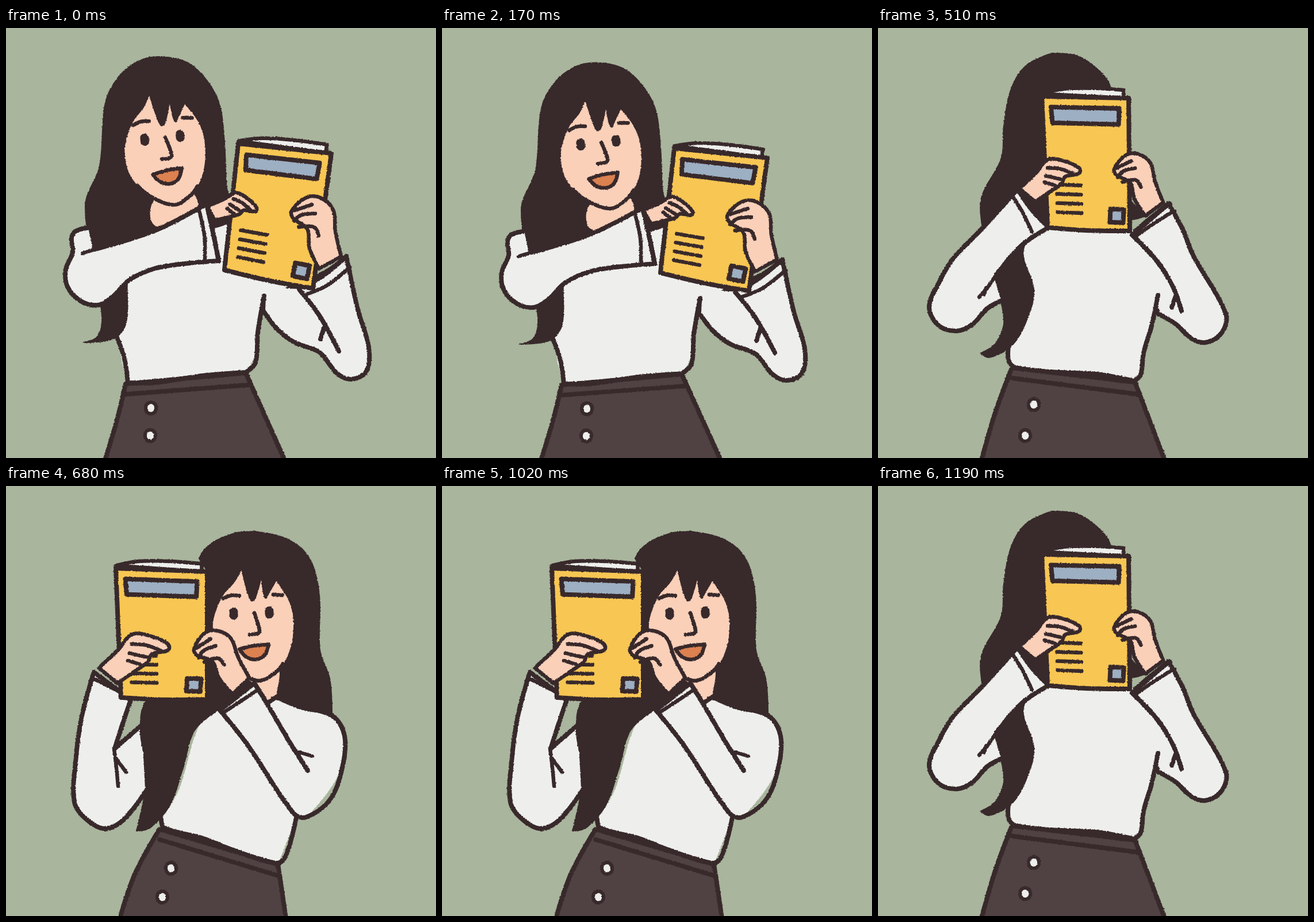
These frames come from a looping animation (748 by 748 pixels, 1360 ms). An HTML page:

```html
<!DOCTYPE html>
<html lang="en">
<head>
<meta charset="utf-8">
<title>Reader swaying with a yellow book</title>
<style>
  html, body { margin: 0; height: 100%; overflow: hidden; background: #a9b59d; }
  svg { display: block; width: 100vw; height: 100vh; }
  path { fill: none; stroke: #38292b; stroke-width: 6.5; stroke-linecap: round; stroke-linejoin: round; }
  .hair { fill: #38292b; stroke-width: 2; }
  .skin { fill: #fad0b9; stroke: none; }
  .hand { fill: #fad0b9; }
  .top { fill: #eeefec; stroke: none; }
  .sleeve { fill: #eeefec; }
  .sleeve, .edge, .skirt, .book, .plate { stroke-width: 8; }
  .skirt { fill: #504143; }
  .page { fill: #eeefec; }
  .book { fill: #f8c653; }
  .plate { fill: #9dafc2; }
  .mouth { fill: #dc8150; }
  .eye { stroke-width: 15; }
  .ring { stroke-width: 24; }
  .pip { stroke: #eeefec; stroke-width: 12; }
</style>
</head>
<body>
<svg viewBox="0 0 748 748">
  <filter id="crayon" filterUnits="userSpaceOnUse" x="-10" y="-10" width="768" height="780" color-interpolation-filters="sRGB">
    <feTurbulence type="fractalNoise" baseFrequency=".35" numOctaves="2"/>
    <feDisplacementMap in="SourceGraphic" scale="3" xChannelSelector="R" yChannelSelector="G"/>
  </filter>
  <g id="stage" filter="url(#crayon)"></g>
</svg>
<script>
const openStyles = ["line", "edge", "eye", "ring", "pip"];
const mix = (a, b, t) => a.map((n, k) => n + (b[k] - n) * t);

// Smooth curve through "x,y" points; "!" marks a corner.
function curve(text, closed, map) {
  const pts = text.split(" ").map(s => ({ xy: map(s.split(",").map(parseFloat)), corner: s.endsWith("!") }));
  const count = pts.length, at = i => pts[(i + count) % count];
  const tangent = i => {
    if (at(i).corner || (!closed && (i === 0 || i === count - 1))) return [0, 0];
    const [a, b] = [at(i - 1).xy, at(i + 1).xy];
    const length = Math.hypot(b[0] - a[0], b[1] - a[1]) || 1;
    return [(b[0] - a[0]) / length, (b[1] - a[1]) / length];
  };
  let d = "M" + pts[0].xy;
  for (let i = 0; i < (closed ? count : count - 1); i++) {
    const p = at(i).xy, q = at(i + 1).xy, reach = Math.hypot(q[0] - p[0], q[1] - p[1]) / 3;
    const u = tangent(i), v = tangent((i + 1) % count);
    d += `C${p.map((n, k) => n + u[k] * reach)} ${q.map((n, k) => n - v[k] * reach)} ${q}`;
  }
  return closed ? d + "Z" : d;
}

// ";" separates curves that share a style.
function shape(style, text, map = p => p) {
  const closed = !openStyles.includes(style);
  return `<path class="${style}" d="${text.split(";").map(part => curve(part, closed, map)).join("")}"/>`;
}

function face(x, y, tilt) {
  const c = Math.cos(tilt * Math.PI / 180), s = Math.sin(tilt * Math.PI / 180);
  const map = ([a, b]) => [x + a * c - b * s, y + a * s + b * c];
  return shape("skin", "-15,-75! -4,-27 2,-20 9,-27 19,-57! 22,-30 26,-24 31,-31 45,-54! 63,-25 72,8 68,55 50,92 8,118 -33,98 -62,60 -68,22 -62,-5 -47,-34 -27,-55", map)
    + shape("line", "-52,78 -33,98 8,118 38,105 52,90;-48,-27 -34,-32 -20,-31;39,-31 55,-29;5,0 13,31 9,36 -5,37", map)
    + shape("eye", "-31,-3 -31,3;31,-3 31,3", map)
    + shape("mouth", "-23,62! 2,57 28,56! 20,74 4,81 -13,75", map);
}

// Grips run along the axis from the wrist (0) to the fingertip (100).
const leftGrip = {
  side: 1,
  outline: "-8,-16! 30,-28 58,-40 80,-28 101,-4 98,5 73,0 62,8 39,12 7,17!",
  fingers: "52,-27 71,-16 88,2;43,-16 67,3;36,-7 50,6"
};
const rightGrip = {
  side: -1,
  outline: "-3,-20! 34,-36 63,-53 90,-48 103,-31 100,0 89,5 63,-3 37,12 2,19!",
  fingers: "98,-4 89,-31;85,6 86,-8 75,-27;73,6 59,-13 44,-11"
};
function hand({ side, outline, fingers }, [x, y], [tipX, tipY]) {
  const ux = (tipX - x) / 100, uy = (tipY - y) / 100;
  const map = ([a, b]) => [x + ux * a - uy * b * side, y + uy * a + ux * b * side];
  return shape("hand", outline, map) + shape("line", fingers, map);
}

// The cover spans 0..100 both ways between its four corners.
function book(topLeft, topRight, bottomRight, bottomLeft) {
  const map = ([u, v]) => mix(mix(topLeft, topRight, u / 100), mix(bottomLeft, bottomRight, u / 100), v / 100);
  const rows = [67, 74, 81, 88].map(v => `13,${v} 42,${v}`).join(";");
  return shape("page", "0,-2! 25,-6 60,-7 94,-6! 94,0!", map)
    + shape("book", "0,0! 100,0! 100,100! 50,101 0,100!", map)
    + shape("plate", "10,8! 89,8! 88,20! 11,20!;77,84! 93,84! 92,94! 76,94!", map)
    + shape("line", rows, map);
}

function skirt(left, right, [hemLeft, hemRight], buttons) {
  const bulge = (right[1] - left[1]) / 8;
  const seam = [(left[0] + hemLeft) / 2 - bulge, (left[1] + 750) / 2];
  const dots = buttons.map(([x, y]) => `${x},${y - 1} ${x},${y + 1}`).join(";");
  return shape("skirt", `${left}! ${seam} ${hemLeft},752! ${hemLeft},790! ${hemRight},790! ${hemRight},752! ${right}!`)
    + shape("edge", `${left[0]},${left[1] + 18} ${right[0] + 4},${right[1] + 21}`)
    + shape("ring", dots) + shape("pip", dots);
}

const low = [
  shape("sleeve", "449,440! 447,491! 471,523 502,547 545,564 575,600 600,611 627,597 631,555 612,490 592,397! 520,448"),
  shape("top", "200,430 193,538! 210,617! 417,600! 437,560 449,464! 500,440 500,360 360,341"),
  skirt([208, 619], [417, 600], [172, 485], [[252, 661], [251, 709]]),
  shape("edge", "193,538 206,575 212,617! 260,617 340,605 417,599! 434,582 438,530 449,466"),
  shape("line", "520,464 558,448 598,416;362,341 392,337"),
  shape("edge", "510,455 545,500 579,562;555,516 547,541"),
  shape("hair", "268,50 315,60 350,92 372,135 380,200 384,278 394,335 250,365 214,425 209,512 188,540 135,547! 158,538 167,512 163,470 138,310 163,240 173,130 196,85 230,58"),
  shape("skin", "258,300 262,345 330,322 321,285"),
  face(272, 191, -6),
  shape("sleeve", "147,347! 122,353 114,365 116,390 104,420 107,450 130,475 160,482 185,468 215,438 260,418 320,409 370,405! 360,355 349,306! 260,352 155,385!"),
  shape("line", "133,392 155,385;336,318 345,360 346,403"),
  book([404, 201], [566, 218], [534, 453], [380, 421]),
  hand(leftGrip, [357, 322], [435, 315]),
  hand(rightGrip, [563, 408], [497, 318]),
  shape("edge", "349,306 360,355 370,405;592,398 565,419 543,431")
].join("");

const rising = [
  shape("sleeve", "490,385! 476,472! 500,497 545,520 577,547 602,555 628,542 633,512 578,390 549,322!"),
  shape("top", "215,420 195,562! 209,610! 436,604! 452,550 476,450! 495,400 480,375 340,337"),
  skirt([213, 610], [436, 603], [181, 490], [[256, 661], [251, 709]]),
  shape("edge", "195,562 204,600 215,609 330,603 380,600 436,602! 452,550 463,500 476,452"),
  shape("edge", "549,322 483,383! 495,398 525,438 562,487"),
  shape("line", "495,396 525,370 557,345;330,338 350,338"),
  shape("hair", "278,24! 345,36 380,65 404,120 380,270 322,350 213,425 225,475 218,520 195,565 173,576! 181,530 178,460 148,310 180,225 186,165 208,78 243,40"),
  shape("skin", "322,295 345,280 352,335 330,338"),
  face(294, 165, -1),
  shape("sleeve", "150,333! 133,350 123,385 103,415 97,450 112,478 140,487 165,475 200,430 245,395 330,367! 315,315 296,275! 200,345 155,370!"),
  shape("line", "124,387 158,370;290,282 303,325 308,370"),
  book([345, 126], [506, 138], [494, 368], [347, 356]),
  hand(leftGrip, [313, 290], [417, 262]),
  hand(rightGrip, [525, 337], [465, 265]),
  shape("edge", "296,275 315,315 330,367;549,322 510,354")
].join("");

const middle = [
  shape("sleeve", "470,440 487,497! 518,515 545,540 570,547 598,530 605,497 548,395 530,350 505,305! 445,355!"),
  shape("top", "253,380 300,350 440,350 490,410 487,465! 472,530 452,615! 235,592! 227,565 232,520 265,480"),
  skirt([233, 591], [447, 616], [180, 499], [[271, 655], [256, 709]]),
  shape("edge", "228,545 227,578 238,590 300,598 380,602 446,614! 457,603 462,565 476,518 487,465"),
  shape("edge", "442,360 485,405 513,450 528,492;518,466 511,486"),
  shape("line", "450,361 480,340 515,318"),
  shape("hair", "302,44! 345,48 380,70 404,102 440,300 463,328 290,350 253,385 271,455 260,505 235,550 195,573 178,566! 205,548 219,505 178,310 215,225 219,170 232,105 258,65"),
  shape("sleeve", "243,280! 180,350 130,402 105,445 89,485 105,517 137,527 165,515 190,488 218,473! 205,430! 250,378 297,347! 265,313"),
  shape("line", "232,290 250,318 268,355;205,430 190,452 176,468;188,452 184,464"),
  book([285, 119], [436, 122], [438, 353], [295, 347]),
  hand(leftGrip, [260, 290], [350, 247]),
  hand(rightGrip, [480, 315], [411, 245]),
  shape("edge", "243,280 265,313 297,347;507,305 475,332 442,360")
].join("");

const turning = [
  shape("hair", "402,81! 440,80 495,95 530,130 545,190 546,285 563,335 567,396! 470,380 350,370 350,150 337,125 360,98"),
  shape("sleeve", "153,324! 132,400 121,480 119,550 140,580 172,596 205,580 246,527! 240,412! 189,457! 204,410 217,372!"),
  shape("line", "188,457 192,490 195,522;190,472 209,498;152,335 198,358"),
  shape("top", "345,400 300,530 270,580! 270,600! 472,662! 505,577! 568,400! 510,384 467,367! 400,375"),
  skirt([267, 597], [473, 658], [198, 487], [[287, 665], [272, 715]]),
  shape("edge", "270,580 275,595 340,612 400,635 470,656 486,645 505,577"),
  shape("hair", "355,280 245,372 234,430 246,500 227,600! 250,595 285,555 308,490 328,425 370,388 420,345"),
  shape("skin", "415,325 432,345 457,376 470,366 467,305"),
  face(427, 221, -2),
  book([191, 143], [350, 149], [350, 371], [200, 368]),
  hand(leftGrip, [178, 329], [282, 279]),
  hand(rightGrip, [408, 348], [327, 284]),
  shape("top", "432,343! 460,380 510,384 568,400 589,435 585,490 522,576 500,570 372,390!"),
  shape("edge", "457,376 470,367! 510,384 568,400 589,435 585,490 564,545 522,576 500,569 420,450 372,390! 432,343! 455,380 490,440 525,495"),
  shape("line", "380,393 436,356;510,463 533,470")
].join("");

const leaning = [
  shape("hair", "455,90! 510,95 550,115 575,160 580,220 578,310 592,370 596,436! 530,420 400,410 360,300 363,220 372,160 400,115"),
  shape("sleeve", "150,402! 155,500 168,570 180,620 210,642 250,637 292,603! 262,580 268,463! 225,515! 220,472! 185,427"),
  shape("edge", "221,472 219,520 232,558 237,592;240,564 253,570"),
  shape("line", "153,421 185,450 218,478"),
  shape("top", "355,460 325,530 290,606! 495,690! 516,610 600,550 615,438! 575,432 528,407! 440,390"),
  skirt([293, 605], [489, 684], [187, 492], [[283, 660], [255, 717]]),
  shape("edge", "293,605 350,625 430,665 487,683 498,672 516,612"),
  shape("hair", "264,450! 262,530 265,575 254,606! 285,598 310,565 335,510 362,450"),
  shape("skin", "443,330 440,375 420,390 465,417 528,406 515,375 512,320"),
  face(467, 229, 0),
  book([188, 236], [351, 222], [374, 455], [227, 464]),
  hand(leftGrip, [173, 412], [261, 355]),
  hand(rightGrip, [394, 407], [312, 349]),
  shape("top", "415,395! 465,419 500,419 528,407! 575,432 615,438! 624,460 605,550 540,614 510,605 355,460!"),
  shape("edge", "528,407 575,432 615,438! 624,460 605,550 570,597 540,614 510,604 440,530 355,460! 415,393! 450,435 490,477 530,500"),
  shape("line", "150,402 185,427 220,472;366,458 420,405;515,491 545,494;422,400 465,417 500,418 528,407")
].join("");

const dip = `<g transform="translate(0 748) scale(1 .985) translate(0 -748)">${low}</g>`;
const stage = document.getElementById("stage");
stage.innerHTML = [low, dip, rising, middle, turning, leaning].map(pose => `<g>${pose}</g>`).join("");

const order = [0, 1, 2, 3, 4, 5, 4, 3], hold = 170;
function tick() {
  const shown = order[Math.floor(performance.now() / hold) % order.length];
  [...stage.children].forEach((g, i) => g.style.display = i === shown ? "" : "none");
  requestAnimationFrame(tick);
}
tick();
</script>
</body>
</html>
```
